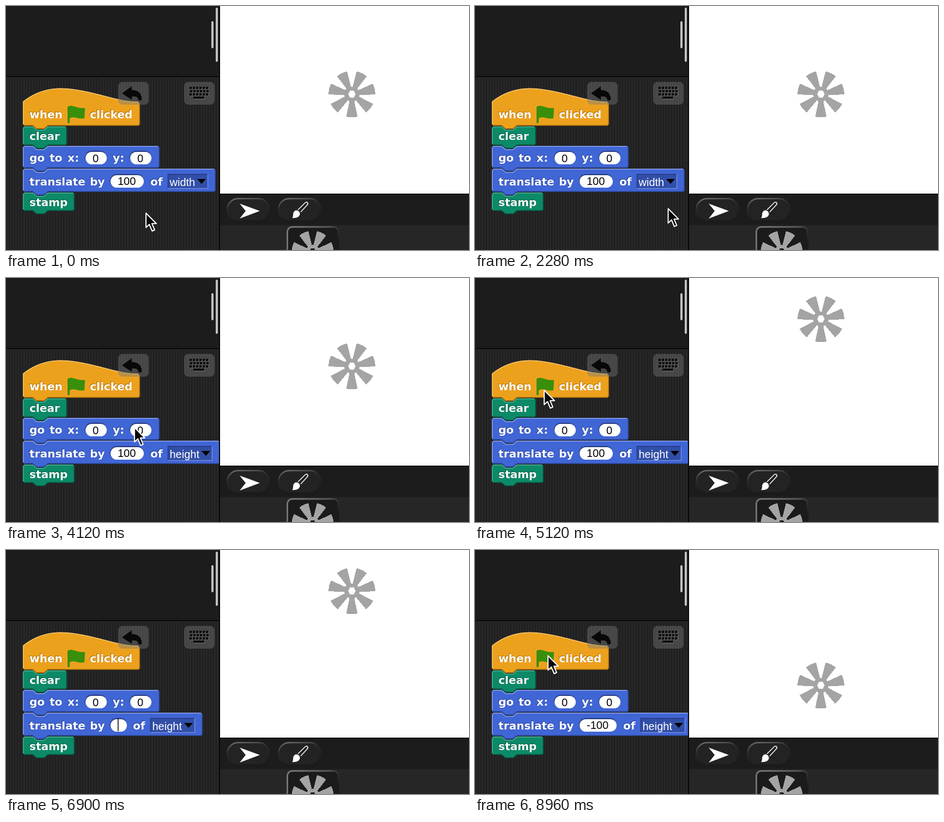
Animation, 850 px wide and 450 px high, one loop 9260 ms. Source, as an HTML page:

```html
<!DOCTYPE html>
<html lang="en">
<head>
<meta charset="utf-8">
<title>Block editor</title>
<style>
  html, body { margin: 0; width: 100%; height: 100%; overflow: hidden; background: #1c1c1c; }
  svg { display: block; width: 850px; height: 450px; }
  text { white-space: pre; }
  .label { font: bold 20px "DejaVu Sans", Verdana, sans-serif; }
  .value { font: 20px "Liberation Sans", Arial, sans-serif; }
</style>
</head>
<body>
<svg id="stage" viewBox="0 0 850 450"></svg>
<script>
const LOOP = 9260;
const stage = document.getElementById('stage');
const ORANGE = ['#eca11d', '#f8c66c', '#a66d0b'];
const GREEN = ['#0c8a68', '#4bb495', '#07553f'];
const BLUE = ['#4065d5', '#8ca4ef', '#2a438e'];

const label = (x, y, s, shade) =>
  `<g class="label"><text x="${x - 1}" y="${y - 1}" fill="${shade}">${s}</text>
   <text x="${x}" y="${y}" fill="#fff">${s}</text></g>`;

// Stack block whose left edge is x = 31, with a notch above and a tab below.
function blockParts(right, top, bottom) {
  const upper = `M31 ${top + 3}L34 ${top}H49l7 6h14l7 -6H${right - 3}l3 3`;
  const lower = `V${bottom - 3}l-3 3H77l-7 6h-14l-7 -6H34l-3 -3`;
  return {
    body: `${upper}${lower}Z`,
    light: `M31.7 ${bottom - 3}V${top + 3}l2.6 -2.3H49l7 6h14l7 -6H${right - 3}`,
    dark: `M${right - 0.7} ${top + 3}V${bottom - 3}l-2.6 2.3H77l-7 6h-14l-7 -6H34`
  };
}

function block(id, right, top, bottom, [fill, light, dark], shape) {
  const p = shape || blockParts(right, top, bottom);
  return `<g id="${id}" fill="none" stroke-width="1.5">
    <path d="${p.body}" fill="${fill}"/>
    <path d="${p.dark}" stroke="${dark}"/><path d="${p.light}" stroke="${light}"/></g>`;
}

const hatCurve = 'C72 144 115 150 160 161S215 177 243 177';
const hat = {
  body: `M31 176${hatCurve}l3 3V218l-3 3H77l-7 6h-14l-7 -6H34l-3 -3Z`,
  light: `M31.7 218V176.5${hatCurve}`,
  dark: 'M245.3 180V218l-2.6 2.3H77l-7 6h-14l-7 -6H34'
};

const pill = (x, y, w, id = '') =>
  `<g id="${id}"><rect x="${x}" y="${y}" width="${w}" height="25" rx="12.5" fill="#24397c"/>
   <rect x="${x + 1}" y="${y + 2}" width="${w - 1}" height="23" rx="11.5" fill="#fff"/></g>`;

function wheel() {
  let blades = '';
  for (let i = 0; i < 7; i++) {
    blades += `<path d="M-4 11L-10.3 41.5A43 43 0 0 1 10.3 41.5L4 11Z" transform="rotate(${i * 360 / 7})"/>`
      .replaceAll('41.5A43 43 0 0 1', '41.5A43 43 0 0 0');
  }
  return `<g fill="#a4a4a4" shape-rendering="crispEdges">${blades}
    <path fill-rule="evenodd" d="M-14 0a14 14 0 1 0 28 0a14 14 0 1 0 -28 0M-7 0L-3.5 6.5H3.5L7 0L3.5 -6.5H-3.5Z"/></g>`;
}

function keyboard() {
  let keys = '';
  for (let row = 0; row < 3; row++) {
    for (let col = 0; col < 6; col++) {
      keys += `<rect x="${337 + col * 6 + (row === 1 ? 1 : 0)}" y="${149 + row * 6}" width="4.4" height="4.4"/>`;
    }
  }
  return `<g>${keys}<rect x="344" y="167" width="20" height="4"/></g>`;
}

const barButton = x =>
  `<rect x="${x}" y="354" width="80" height="44" rx="21" fill="#232323"/>
   <rect x="${x + 1.2}" y="355.2" width="77.6" height="41.6" rx="20" fill="none" stroke="url(#rim)" stroke-width="2.4"/>`;

stage.innerHTML = `
<defs>
  <pattern id="stripes" width="5" height="8" patternUnits="userSpaceOnUse">
    <rect width="5" height="8" fill="#272727"/><rect width="2" height="8" fill="#1f1f1f"/>
  </pattern>
  <linearGradient id="rim" x1="0" y1="0" x2=".35" y2="1">
    <stop offset="0" stop-color="#777"/><stop offset=".4" stop-color="#2c2c2c"/>
    <stop offset="1" stop-color="#191919"/>
  </linearGradient>
  <linearGradient id="iconRim" x1="0" y1="0" x2="1" y2=".4">
    <stop offset="0" stop-color="#777"/><stop offset=".7" stop-color="#555"/>
    <stop offset="1" stop-color="#1a1a1a"/>
  </linearGradient>
  <clipPath id="pane"><rect width="391" height="450"/></clipPath>
  <filter id="soft" x="-20%" y="-20%" width="140%" height="140%"><feGaussianBlur stdDeviation="2"/></filter>
</defs>
<rect width="850" height="450" fill="#1c1c1c"/>
<rect y="131" width="391" height="319" fill="url(#stripes)"/>
<rect y="129.5" width="391" height="1.5" fill="#050505"/>
<g fill="#bfc1c3">
  <rect x="377" y="28" width="4" height="50" rx="2"/><rect x="385" y="3" width="4" height="100" rx="2"/>
</g>
<rect x="391" width="2" height="450" fill="#080808"/>

<rect x="393" width="457" height="346" fill="#fff"/>
<rect x="393" y="346" width="457" height="2" fill="#080808"/>
<rect x="393" y="404" width="457" height="46" fill="#262626"/>
${barButton(405)}${barButton(499)}
<path d="M429 364.5L466 378L429 392L440 378Z" fill="#fff"/>
<path d="M525 391C529 388 525 382 530 378C534 374 542 380 539 386C536 391 530 391 525 391Z" fill="#fff"/>
<path d="M536 376L549 363C553 360 556 364 553 367L541 380" fill="none" stroke="#fff" stroke-width="1.5"/>
<rect x="515" y="406" width="97" height="80" rx="10" fill="#1b1b1b"/>
<rect x="516.5" y="407.5" width="94" height="77" rx="9" fill="none" stroke="url(#iconRim)" stroke-width="3"/>
<g transform="translate(563 453) scale(.9)">${wheel()}</g>
<g id="sprite">${wheel()}</g>

<g clip-path="url(#pane)">
  ${block('hat', 0, 0, 0, ORANGE, hat)}
  ${label(43, 207, 'when', ORANGE[2])}${label(154, 207, 'clicked', ORANGE[2])}
  <path d="M113 186C122 180 128 190 145 188L144 207C132 210 126 202 117 207V216H113Z" fill="#398f0b"/>
  ${block('clear', 112, 222, 257, GREEN)}${label(43, 247, 'clear', GREEN[2])}
  ${block('goto', 282, 258, 299, BLUE)}
  ${label(43, 287, 'go', BLUE[2])}${label(80, 287, 'to', BLUE[2])}
  ${label(113, 287, 'x:', BLUE[2])}${label(196, 287, 'y:', BLUE[2])}
  ${pill(145, 267, 40)}${pill(227, 267, 40)}
  <g class="value"><text x="159" y="288">0</text><text x="241" y="288">0</text></g>
  ${block('translate', 385, 300, 343, BLUE)}
  ${label(43, 331, 'translate', BLUE[2])}${label(154, 331, 'by', BLUE[2])}
  ${pill(191, 310, 62, 'slot')}
  <rect id="selection" x="205" y="312" height="21" fill="#3c3c78"/>
  <text id="number" class="value" x="205" y="330"></text>
  <rect id="caret" y="311" width="1.5" height="23"/>
  <g id="tail">
    ${label(0, 331, 'of', BLUE[2])}
    <rect id="box" x="32" y="310.5" height="26" fill="#324fa8"/>
    <path id="boxDark" fill="none" stroke="#22367a" stroke-width="1.5"/>
    <path id="boxLight" fill="none" stroke="#8299e2" stroke-width="1.2"/>
    <text id="choice" class="value" x="35.5" y="332" fill="#fff"></text>
    <path id="arrow" d="M0 319H16L8 328Z"/>
  </g>
  ${block('stamp', 126, 344, 378, GREEN)}${label(43, 369, 'stamp', GREEN[2])}
  <g fill="#777" fill-opacity=".42">
    <rect x="206" y="140" width="56" height="42" rx="8"/><rect x="327" y="140" width="56" height="42" rx="8"/>
  </g>
  <path d="M213 161L231 148V155C244 155 250 163 249 174H243C243 168 239 166 231 167V173Z" fill="#080808"/>
  <g fill="#777" transform="translate(1 1)">${keyboard()}</g><g fill="#080808">${keyboard()}</g>
</g>

<g id="menu">
  <rect x="361" y="326" width="89" height="90" rx="10" fill="#000" opacity=".65" filter="url(#soft)"/>
  <rect x="356.5" y="323" width="86.5" height="86" rx="8" fill="#fff" stroke="#353535" stroke-width="4.5"/>
  <rect id="hover" x="361" width="76" height="24" fill="#b9b9b9"/>
  <g class="value"><text x="369" y="375">width</text><text x="369" y="399">height</text></g>
</g>
<path id="cursor" d="M1 2V28.5L7.2 22.8L12.3 35L16.8 33L11.8 21.2H20Z" fill="#060606" stroke="#fff" stroke-width="2" stroke-linejoin="round"/>
`;

const part = {};
stage.querySelectorAll('[id]').forEach(el => part[el.id] = el);

const set = (el, attrs) => {
  for (const name in attrs) el.setAttribute(name, attrs[name]);
};
const show = (el, on) => el.setAttribute('visibility', on ? 'visible' : 'hidden');

// time, x, y
const pointerPath = [
  [0, 256, 380], [1900, 256, 380], [1901, 336, 452], [2550, 364, 324], [2760, 364, 324],
  [3240, 399, 381], [3750, 399, 381], [4400, 128, 204], [5120, 126, 205], [5450, 126, 205],
  [6100, 222, 322], [7540, 222, 322], [7880, 141, 207], [8150, 135, 200], [8960, 133, 193], [LOOP, 133, 193]
];

function pointerAt(t) {
  const i = pointerPath.findIndex(key => key[0] > t);
  const [t0, x0, y0] = pointerPath[i - 1], [t1, x1, y1] = pointerPath[i];
  const k = (t - t0) / (t1 - t0), e = k * k * (3 - 2 * k);
  return [x0 + (x1 - x0) * e, y0 + (y1 - y0) * e];
}

const typing = [[0, '100'], [6700, ''], [7030, '-'], [7160, '-1'], [7290, '-10'], [7410, '-100']];
const digitsWidth = s => [...s].reduce((w, c) => w + (c === '-' ? 6.66 : 11.12), 0);

function drawTranslate(t) {
  const number = typing.filter(key => key[0] <= t).pop()[1];
  const choice = t < 3480 ? 'width' : 'height';
  const textWidth = digitsWidth(number);
  const slotWidth = Math.max(31, Math.round(textWidth + 28.7));
  const tailX = 191 + slotWidth + (number ? 12 : 11);
  const boxWidth = choice === 'width' ? 74 : 82;
  const boxRight = 32 + boxWidth;
  const editing = t >= 6180 && t < 8150;
  const selected = editing && t < 6700;

  const shape = blockParts(tailX + boxRight + 14, 300, 343);
  [shape.body, shape.dark, shape.light].forEach((d, i) => set(part.translate.children[i], { d }));
  set(part.slot.children[0], { width: slotWidth });
  set(part.slot.children[1], { width: slotWidth - 1 });
  part.number.textContent = number;
  set(part.number, { fill: selected ? '#fff' : '#000' });
  set(part.selection, { width: textWidth });
  show(part.selection, selected);
  set(part.caret, { x: 205 + textWidth });
  show(part.caret, editing && !selected);

  set(part.tail, { transform: `translate(${tailX} 0)` });
  set(part.box, { width: boxWidth });
  set(part.boxDark, { d: `M32.5 337V310.5H${boxRight}` });
  set(part.boxLight, { d: `M32 336.5H${boxRight - 0.5}V310` });
  part.choice.textContent = choice;
  set(part.arrow, { transform: `translate(${boxRight - 20} 0)` });
}

function draw(t) {
  drawTranslate(t);
  const spriteY = t < 4480 ? 162.5 : t < 8150 ? 75.5 : 249.5;
  set(part.sprite, { transform: `translate(635 ${spriteY})` });

  const [x, y] = pointerAt(t);
  set(part.cursor, { transform: `translate(${x.toFixed(1)} ${y.toFixed(1)})` });
  show(part.cursor, t < 500 || (t >= 1901 && t < 6650) || t >= 7540);

  const open = t >= 2640 && t < 3480;
  const row = Math.floor((y - 331) / 24);
  show(part.menu, open);
  set(part.hover, { y: 331 + Math.max(0, row) * 24 });
  show(part.hover, open && row >= 0 && row < 3);
}

function tick() {
  draw(performance.now() % LOOP);
  requestAnimationFrame(tick);
}
tick();
</script>
</body>
</html>
```
